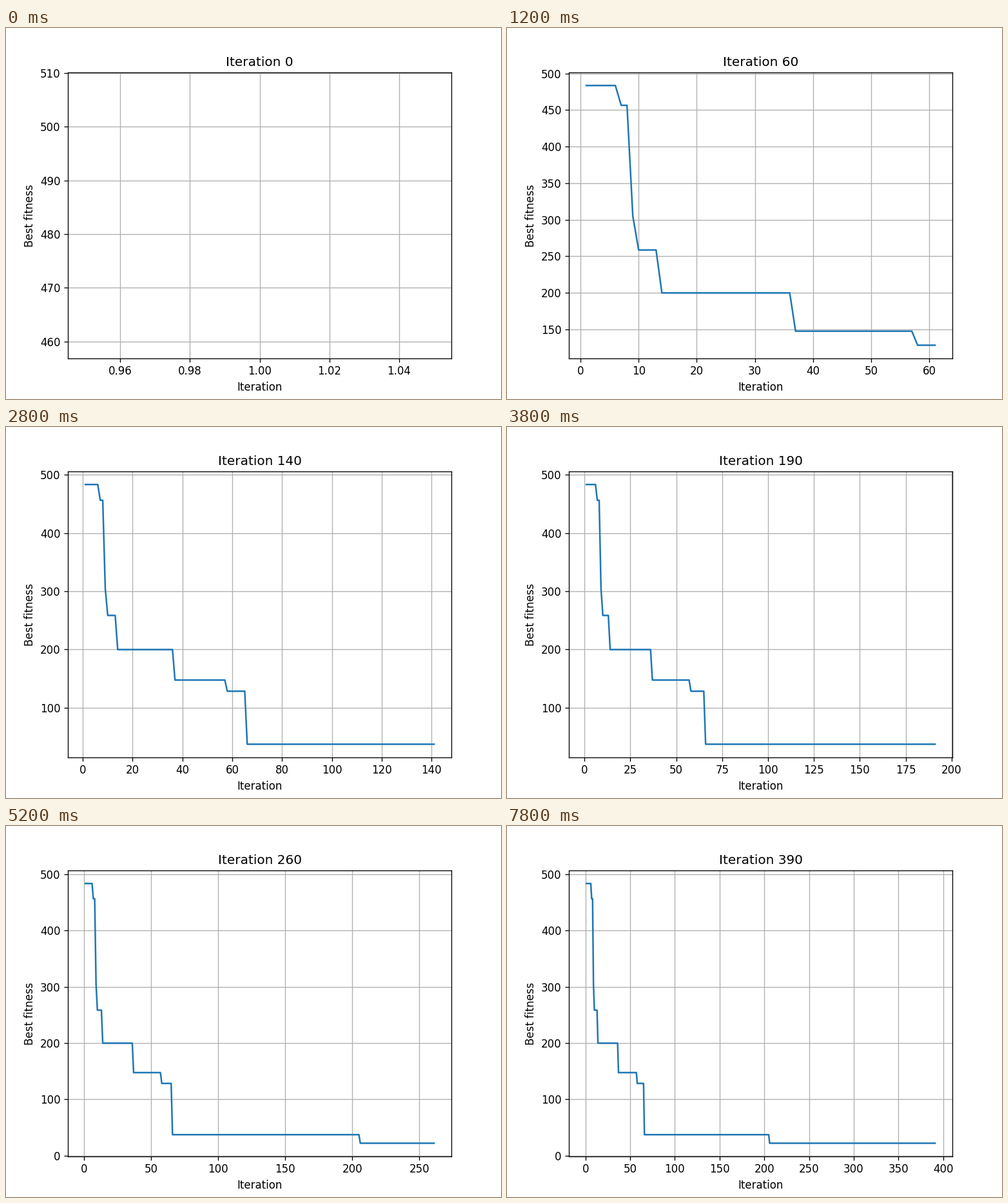
Write a matplotlib script that moves like this. It is 768x576 px and loops after 8000 ms.

```python
import matplotlib.pyplot as plt
import numpy as np
from matplotlib.animation import FuncAnimation

FRAMES, INTERVAL, STEP = 40, 200, 10

# Key points: iteration of each improvement and the best fitness it reaches
STARTS = [1, 7, 9, 10, 14, 37, 58, 66, 206]
BEST = np.array([483.495, 456.4, 305, 258.6, 199.9, 147.6, 128.4, 37.35, 22.2])


def best_fitness(iteration):
    """The best value holds until the next improvement."""
    return BEST[np.searchsorted(STARTS, iteration, side="right") - 1]


plt.rcParams["font.family"] = "DejaVu Sans"
fig, ax = plt.subplots(figsize=(6.4, 4.8), dpi=120)


def draw(frame):
    iteration = frame * STEP
    x = np.arange(1, iteration + 2)
    ax.clear()
    ax.plot(x, best_fitness(x), color="#1f77b4")
    ax.set_title(f"Iteration {iteration}")
    ax.set_xlabel("Iteration")
    ax.set_ylabel("Best fitness")
    ax.grid(True)
    return ax.get_children()


anim = FuncAnimation(fig, draw, frames=FRAMES, init_func=lambda: draw(0),
                     interval=INTERVAL, repeat=True, repeat_delay=0, blit=False)

plt.show()
```
